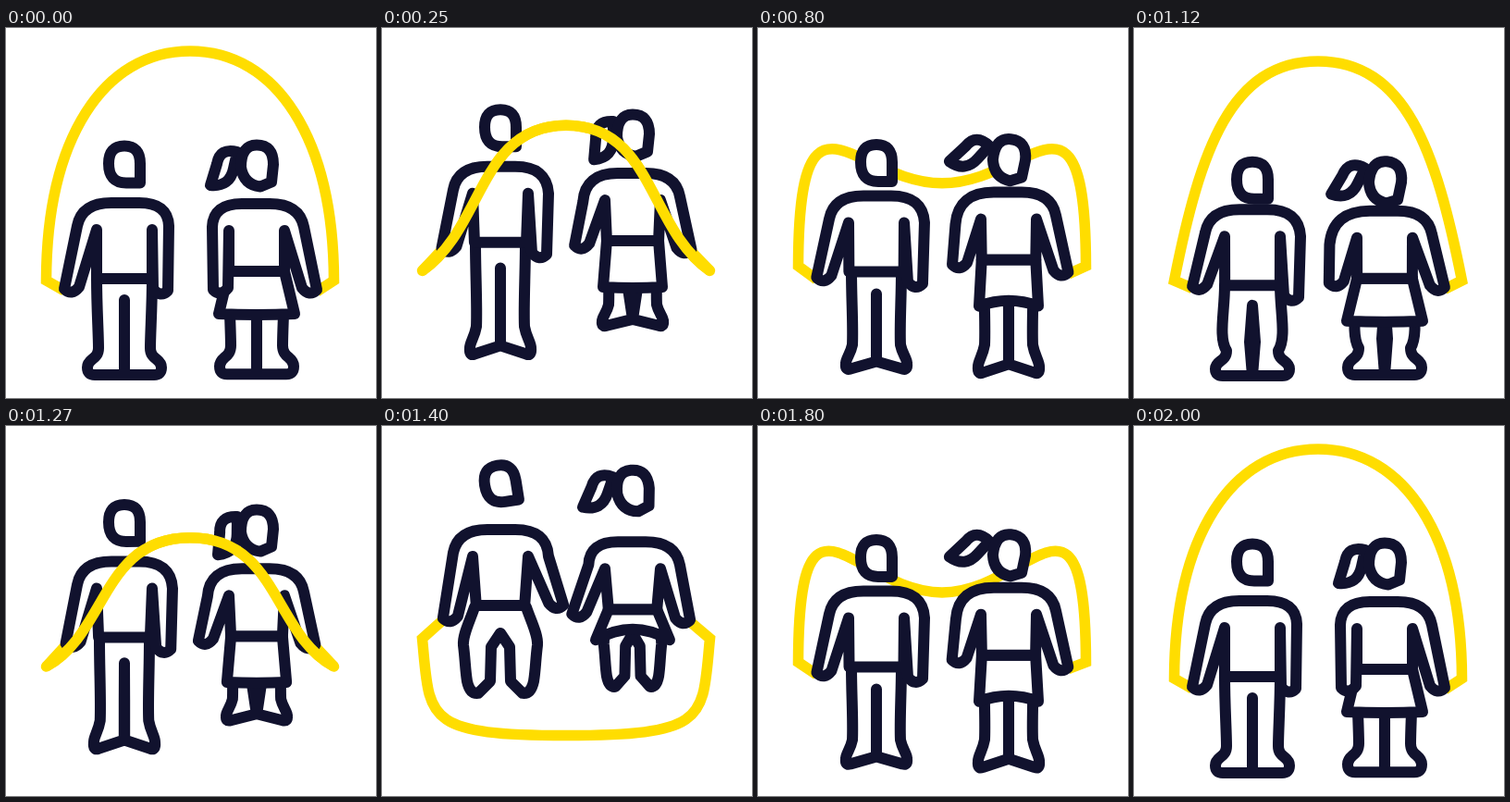
Animation, 400 px wide and 400 px high, one loop 2020 ms. Source, as an HTML page:

```html
<!DOCTYPE html>
<html lang="en">
<head>
<meta charset="utf-8">
<title>Skipping rope</title>
<style>
  html, body { margin: 0; width: 100%; height: 100%; overflow: hidden; background: #fff; }
  svg { display: block; width: 100%; height: 100%; }
  .ink path { fill: #fff; stroke: #11122e; stroke-width: 12; stroke-linejoin: round; stroke-linecap: round; }
  .rope { fill: none; stroke: #fd0; stroke-width: 11.5; }
  #front { stroke-linecap: round; }
</style>
</head>
<body>
<svg viewBox="0 0 400 400">
  <path id="back" class="rope"/>
  <g class="ink">
    <path id="boyLegs"/>
    <path id="boyHead" d="M-17 -1Q-17 -20 0 -20Q17 -20 17 -1L17 20L2 20Q-17 20 -17 -1Z"/>
    <path id="boyShirt"/>
    <path id="girlLegs"/>
    <path id="skirt"/>
    <path id="tail" d="M0 0Q-19 -5 -22 13L-29 36Q-8 38 -4 18Z"/>
    <path id="girlHead" d="M-17 2Q-17 -22 0 -22Q18 -22 18 -1L16 18L4 23Q-14 21 -17 2Z"/>
    <path id="girlShirt"/>
  </g>
  <path id="front" class="rope"/>
</svg>
<script>
const JUMP = 1010; // one jump with one turn of the rope
const REST = 990;  // standing again

// Half a pair of legs, measured from the middle of the waist.
const shape = text => text.split(', ').map(pair => pair.split(' ').map(Number));
const STAND = shape('-30 0, -30 30, -28 60, -28 75, -28 88, -40 86, -40 96, -40 104, -32 104, 0 104, 0 65, 0 23');
const POINT = shape('-27 0, -27 29, -25 59, -26 79, -28 89, -33 94, -33 99, -34 107, -28 105, 0 97, 0 59, 0 24');
const TUCK = shape('-28 2, -33 17, -41 32, -40 43, -38 59, -38 70, -36 82, -33 96, -24 95, -11 82, -10 45, 0 30');

const boy = { name: 'boy', x: 128, side: 1, collar: 189, waist: 82, height: 81, land: 850 };
const girl = { name: 'girl', x: 271, side: -1, collar: 190, waist: 73, height: 68, land: 880 };

// Eased 0 to 1 between a and b; hold rises and falls again; bump peaks at b.
function ramp(t, a, b) {
  const u = Math.min(1, Math.max(0, (t - a) / (b - a)));
  return u * u * (3 - 2 * u);
}
const hold = (t, a, b, c, d) => ramp(t, a, b) - ramp(t, c, d);
const bump = (t, a, b, c) => hold(t, a, b, b, c);

const mix = (from, to, amount) =>
  from.map((p, i) => p.map((value, j) => value + (to[i][j] - value) * amount));

// Fills a pattern such as 'MLQ' with points.
function trace(pattern, points) {
  const count = { M: 1, L: 1, Q: 2, C: 3, Z: 0 };
  let n = 0;
  return [...pattern].map(c =>
    c + points.slice(n, n += count[c]).map(p => p.map(v => v.toFixed(2)).join(' ')).join(' ')
  ).join('');
}

const set = (id, name, value) => document.getElementById(id).setAttribute(name, value);
const draw = (id, pattern, points) => set(id, 'd', trace(pattern, points));
const place = (id, x, y, angle) => set(id, 'transform', `translate(${x} ${y}) rotate(${angle})`);
const mirror = (points, axis) => points.map(([x, y]) => [2 * axis - x, y]).reverse();

// How far the body is into each part of the jump.
function phases(t) {
  return {
    crouch: bump(t, 0, 110, 230),
    push: bump(t, 110, 250, 390),
    toes: hold(t, 130, 250, 800, REST),
    tuck: hold(t, 250, 390, 600, 780),
    settle: bump(t, 590, 790, REST),
    reach: hold(t, 250, 450, 570, 780),
    sway: hold(t, 0, 110, 790, REST)
  };
}

function drawLegs(who, toWorld, p, stretch, slim, gap) {
  const half = mix(mix(STAND, POINT, p.toes), TUCK, p.tuck);
  half[2][0] -= 9 * p.crouch;
  half[10][0] -= gap;
  const scaled = half.map(([x, y]) => [x * slim, who.waist + y * stretch]);
  draw(who.name + 'Legs', 'MCCQLLLLLLLQCC', [...scaled, ...mirror(scaled, 0)].map(toWorld));
}

function drawShirt(who, toWorld, air, ropeHand, freeHand, bow) {
  const waist = 30 - 4 * air;
  const arm = ([x, y], inward) => [[x + inward, y - 4], [x + inward / 2, y + 6], [x, y - 2]];
  draw(who.name + 'Shirt', 'MLLQLQLQLQLLZ', [
    [-waist, who.waist], [-30, 29], ...arm(ropeHand, 16), [-51, 25], [-46, 0], [-14, 0],
    [16, 0], [47 + bow * 0.8, 0], [48 + bow, 25 + bow], ...arm(freeHand, -16).reverse(),
    [30, 29], [waist, who.waist]
  ].map(toWorld));
}

function drawSkirt(toWorld, p, air) {
  const waist = 30 - 4 * air;
  const width = 41 - 9 * p.toes + 8 * p.tuck;
  const y = girl.waist + 46 + 4 * p.toes - 17 * p.tuck;
  const middle = y + 2 - 25 * p.tuck - 14 * p.settle;
  draw('skirt', 'MLQLZ', [
    [-waist, girl.waist], [-width, y], [0, middle], [width, y], [waist, girl.waist]
  ].map(toWorld));
}

// Draws a child and returns where the hand holds the rope.
function drawChild(who, t, p) {
  const isBoy = who === boy;
  const air = hold(t, 70, 440, 590, who.land);
  const collar = who.collar - who.height * air + 10 * p.crouch;
  const toWorld = ([x, y]) => [who.x + who.side * x, collar + y];

  const shrug = isBoy ? -3 : 9;
  const ropeHand = [-65 + 3 * air, 95 - 10 * p.crouch - 6 * p.push - 5 * p.settle - shrug * air];
  const freeHand = isBoy
    ? [47 + 3 * p.sway + 23 * p.reach, 97 - 17 * p.reach]
    : [47 + 13 * p.sway + 6 * air, 95 - 15 * p.sway];
  const bow = isBoy ? 4 * p.sway : 12 * p.sway - 13 * air;

  const stretch = isBoy
    ? 1 - 0.06 * p.crouch + 0.15 * p.push
    : 1.07 - 0.06 * p.crouch - 0.1 * p.push - 0.2 * air + 0.13 * p.settle;
  const slim = isBoy ? 1 : 1 - 0.22 * p.tuck;
  drawLegs(who, toWorld, p, stretch, slim, 3 * p.crouch + (isBoy ? 0 : 5 * p.push));

  const nod = 10 * p.crouch + 6 * p.settle - (isBoy ? 8 : 14) * p.tuck;
  const tilt = isBoy ? -9 * p.tuck : 6 * (p.crouch + p.settle) - 5 * p.tuck;
  if (!isBoy) {
    drawSkirt(toWorld, p, air);
    const swing = 14 * p.crouch - 12 * p.push + 30 * hold(t, 300, 600, 800, REST);
    place('tail', 250, collar - 56 + nod, swing);
  }
  place(who.name + 'Head', who.x, collar - 41.5 + nod, tilt);
  drawShirt(who, toWorld, air, ropeHand, freeHand, bow);
  return toWorld(ropeHand);
}

function drawRope(t, p, boyHand, girlHand) {
  const endY = 273 - 46 * hold(t, 170, 430, 600, 930);
  const middle = 25 + 11 * p.crouch + 355 * hold(t, 159, 458, 555, REST);
  const pull = 66 * bump(t, 0, 250, 430);
  const bendY = 120 + 230 * ramp(t, 50, 500) - 310 * ramp(t, 570, 790) + 80 * ramp(t, 790, REST);
  const half = [
    [43.5, endY], [44 + pull, bendY], [105 - 62 * bump(t, 250, 390, 570), middle], [199, middle]
  ];
  const arc = [...half, ...mirror(half, 199).slice(1)];
  draw('back', 'MLCCL', [boyHand, ...arc, girlHand]);
  // On the way down the rope passes in front of the children.
  draw('front', t > 130 && t < 380 ? 'MCC' : '', arc);
}

function frame() {
  const t = performance.now() % JUMP;
  const p = phases(t);
  drawRope(t, p, drawChild(boy, t, p), drawChild(girl, t, p));
  requestAnimationFrame(frame);
}
frame();
</script>
</body>
</html>
```
